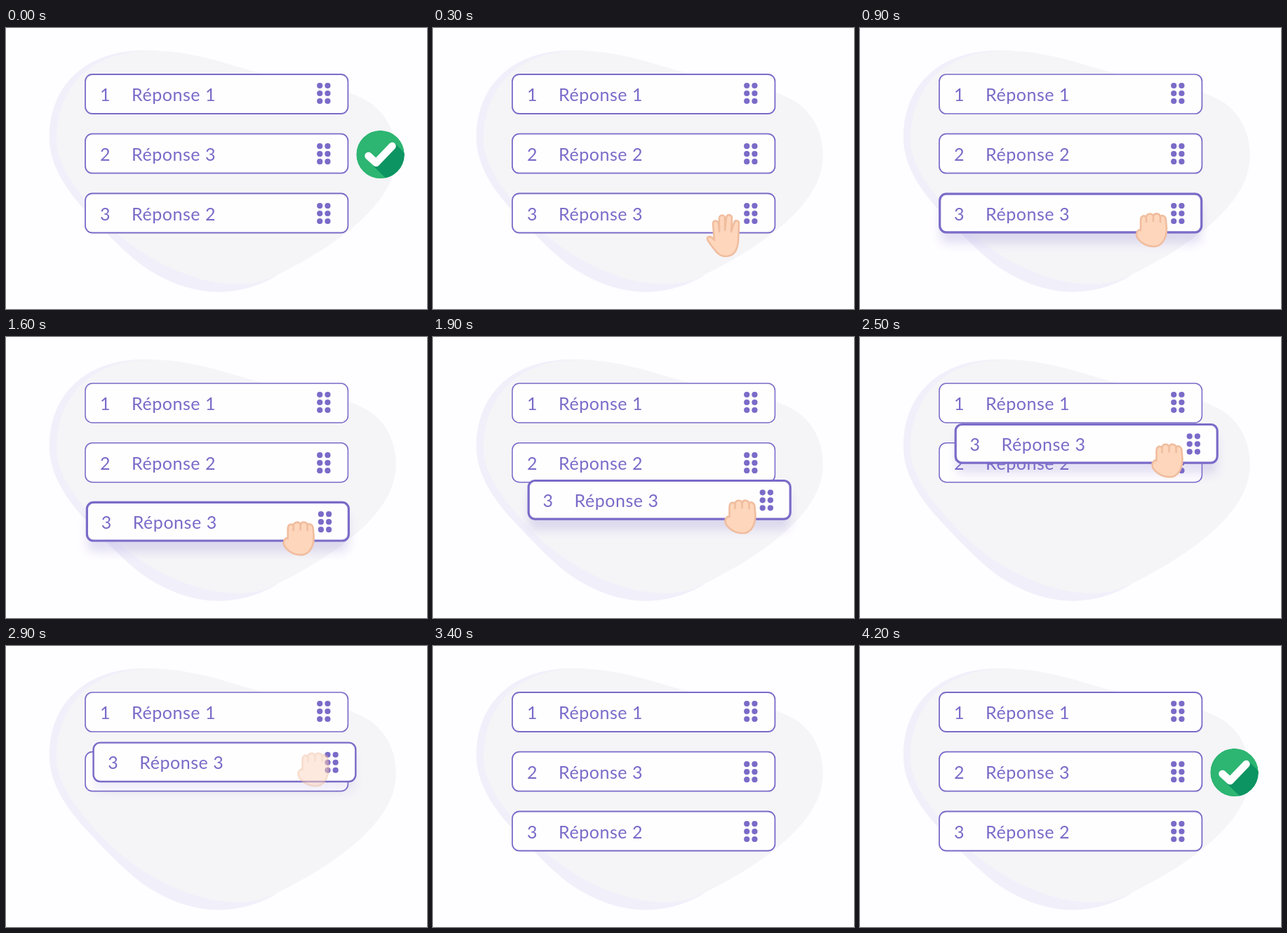
Recreate the animation shown at these times as an HTML page. Size 600x400 px, loop 5000 ms.

```html
<!DOCTYPE html>
<html lang="fr">
<head>
<meta charset="utf-8">
<title>Classement par glisser-déposer</title>
<style>
  html, body { margin: 0; width: 100%; height: 100%; overflow: hidden; background: #fefdff; }
  svg { display: block; width: 100vw; height: 100vh; }
  text { font: 400 25px Lato, "Open Sans", sans-serif; fill: #7a6bc8; letter-spacing: .55px; white-space: pre; }
</style>
</head>
<body>
<svg viewBox="0 0 600 400">
  <defs>
    <filter id="blur" x="-10%" y="-60%" width="120%" height="220%">
      <feGaussianBlur stdDeviation="7"/>
    </filter>
    <clipPath id="disc"><circle cx="533.5" cy="180" r="34.3"/></clipPath>
  </defs>

  <path fill="#f1effa" d="M62 160C60 90 105 33 195 32C260 32 300 48 360 64L385 353C330 385 270 382 215 351C185 335 155 305 115 262C85 230 63 195 62 160Z"/>
  <path fill="#f5f4f7" d="M72 165C70 100 105 45 180 34C250 27 300 47 360 64C420 80 470 78 515 104C560 132 562 188 548 218C525 272 450 322 375 357C310 382 215 345 150 285C105 240 75 200 72 165Z"/>

  <g id="check">
    <g clip-path="url(#disc)">
      <circle cx="533.5" cy="180" r="34.3" fill="#2db572"/>
      <path fill="#0c9462" d="M554 164L590 200L560 232L523 196Z"/>
    </g>
    <path fill="none" stroke="#fff" stroke-width="10.5" stroke-linecap="round" stroke-linejoin="round" d="M516.5 182L527.5 192L550.5 168"/>
  </g>

  <g id="cards"></g>

  <g id="hand" fill="#fdd6bc" stroke="#f0bd9e" stroke-width="2.6" stroke-linejoin="round" stroke-linecap="round">
    <path id="open" d="M401 302L399 279C399 273 406 273 407 279L408 290L408 271C408 265 416 265 416 271V288L418 270C419 264 426 265 426 271L425 290L429 277C431 272 437 274 436 280L435 303C434 317 428 325 417 325C407 325 403 318 392 303C388 297 395 294 401 302Z"/>
    <path id="fist" d="M400 288V274C400 266 407 266 408 270C408 263 417 263 418 268C419 263 427 263 428 269C429 265 436 267 436 274L437 285C437 300 430 311 419 311C404 311 394 300 394 294C394 289 398 286 400 288ZM408 270V276M418 268V275M428 269V276"/>
  </g>
</svg>

<script>
const LOOP = 5000, STEP = 100;
const SLOTS = [66, 150.7, 235.5];
const INK = '#7a6bc8';
const $ = id => document.getElementById(id);

function add(parent, tag, attrs) {
  const el = document.createElementNS('http://www.w3.org/2000/svg', tag);
  for (const k in attrs) el.setAttribute(k, attrs[k]);
  return parent.appendChild(el);
}

function makeCard(i) {
  const g = add($('cards'), 'g', {});
  const shadow = add(g, 'rect', { x: 114, y: 16, width: 372, height: 55, rx: 10, fill: INK, filter: 'url(#blur)' });
  const box = add(g, 'rect', { fill: '#fffeff', stroke: INK });
  const num = add(g, 'text', { x: 134, y: 38 });
  add(g, 'text', { x: 179, y: 38 }).textContent = 'Réponse ' + (i + 1);
  const top = i ? 17.5 : 16;
  for (let k = 0; k < 6; k++) {
    add(g, 'circle', { cx: 447.2 + 11.2 * (k % 2), cy: top + 11 * (k >> 1), r: 4.1, fill: INK });
  }
  return { g, shadow, box, num };
}

const cards = SLOTS.map((_, i) => makeCard(i));
const clamp = v => Math.max(0, Math.min(1, v));
const ramp = (t, a, b) => clamp((t - a) / (b - a));
const smooth = u => u * u * (3 - 2 * u);
const show = (el, on) => el.setAttribute('opacity', on);
const move = (el, x, y) => el.setAttribute('transform', `translate(${x} ${y})`);

// lift: 0 = resting, 1 = thick border with shadow
function setCard(card, x, y, number, lift, line) {
  const inset = .7 * lift;
  const attrs = { x: 113 + inset, y: inset, width: 374.4 - 2 * inset, height: 56 - 2 * inset,
    rx: 10 - inset, 'stroke-width': line + (3.2 - line) * lift };
  for (const k in attrs) card.box.setAttribute(k, attrs[k]);
  show(card.shadow, .2 * lift);
  card.num.textContent = number;
  move(card.g, x, y);
}

function render(time) {
  const t = Math.floor(time % LOOP / STEP) * STEP;
  const sorted = t < 100 || t >= 3400;
  const drop = smooth(ramp(t, 2700, 3100));
  const line = 1.8 - .25 * ramp(t, 800, 1200) * (1 - drop);

  const dragX = 22.5 * smooth(ramp(t, 1550, 1850));
  const dragY = -112.5 * smooth(ramp(Math.min(t, 2500), 1550, 2550));
  const fromY = SLOTS[2] + dragY;

  setCard(cards[0], 0, SLOTS[0], 1, 0, line);
  setCard(cards[1], 0, SLOTS[sorted ? 2 : 1], sorted ? 3 : 2, 0, line);
  if (sorted) setCard(cards[2], 0, SLOTS[1], 2, 0, line);
  else setCard(cards[2], dragX * (1 - drop), fromY + (SLOTS[1] - fromY) * drop, 3, t < 900 ? 0 : 1 - drop, line);

  show($('hand'), sorted ? 0 : ramp(t, 0, 300) * (1 - drop));
  show($('open'), t < 900 ? 1 : 0);
  show($('fist'), t < 900 ? 0 : 1);
  move($('hand'), dragX, dragY);

  show($('check'), t < 100 ? 1 : ramp(t, 3400, 3600));
}

const start = performance.now();
(function tick() {
  render(performance.now() - start);
  requestAnimationFrame(tick);
})();
</script>
</body>
</html>
```
